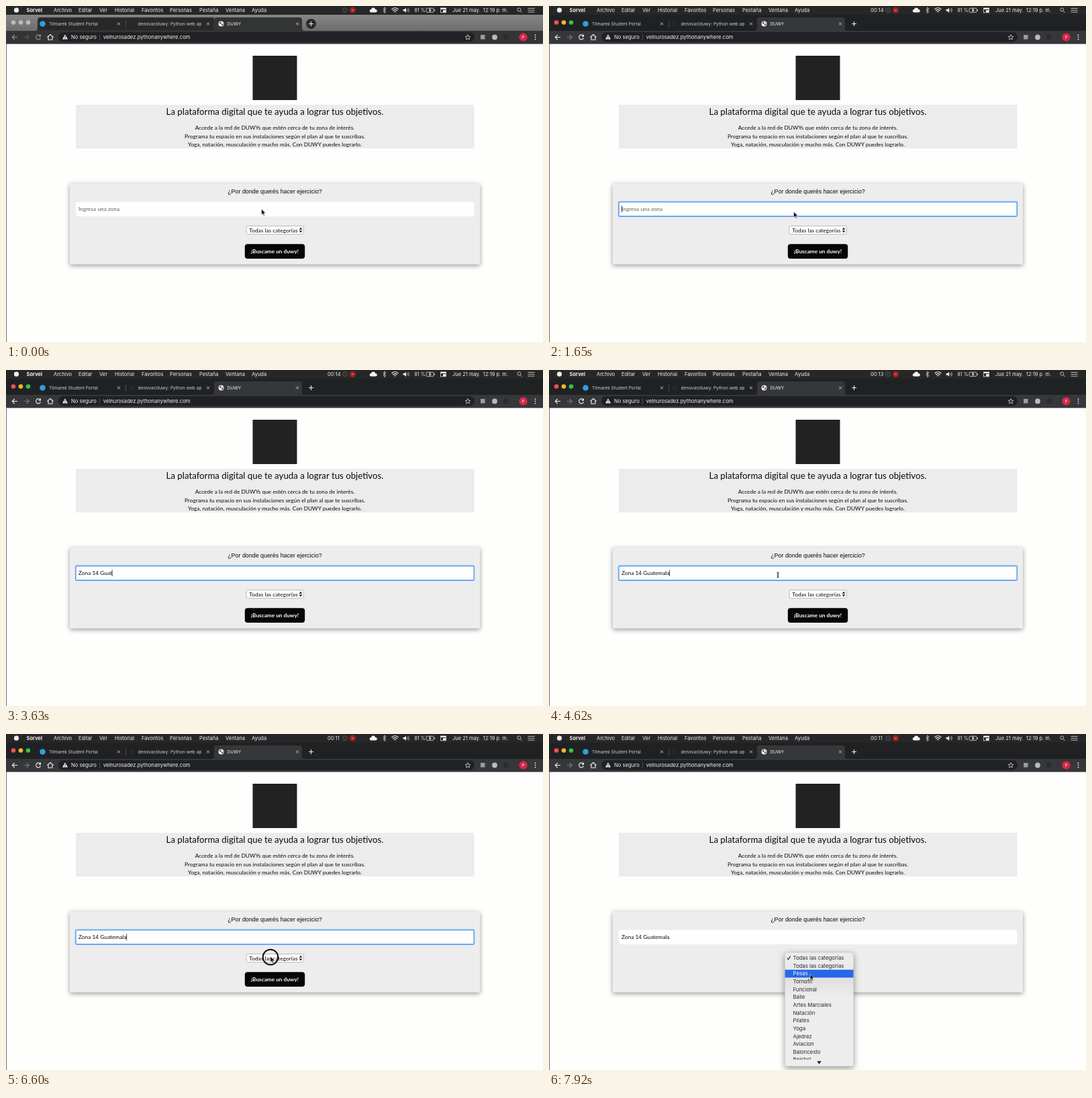
An HTML page that plays this animation: 800x500 px, repeating every 8000 ms.

```html
<!DOCTYPE html>
<html lang="es">
<head>
<meta charset="utf-8">
<title>Búsqueda por zona</title>
<style>
  html, body { margin: 0; width: 100%; height: 100%; overflow: hidden; background: #fefefc; }
  svg { display: block; width: 100vw; height: 100vh; }
  text { white-space: pre; }
  .ui { font-family: Inter, sans-serif; font-size: 7.5px; fill: #f1f1f1; }
  .tab { font-size: 6.6px; fill: #cfd0d2; }
  .address { font-size: 7.7px; }
  .page { font-family: Lato, sans-serif; font-size: 8.33px; fill: #0a0a0a; }
  .mid { text-anchor: middle; }
  .line { fill: none; stroke: #eee; stroke-width: 1.1; }
  .thin { fill: none; stroke: #ddd; stroke-width: .8; }
  .strip { fill: #202123; }
  .tabs { fill: #202123; }
  .open { fill: #36373a; }
  .plus { fill: none; }
  .idle .strip { fill: url(#idleStrip); }
  .idle .tabs { fill: #282828; stroke: #555; stroke-width: .6; }
  .idle .open { fill: #333435; }
  .idle .plus { fill: #2b2b2b; }
  .idle .nav { opacity: .5; }
  .card { filter: drop-shadow(0 2px 3.5px #0006); }
  .menu { filter: drop-shadow(0 3px 5px #0006); }
  .option { font-size: 7.8px; fill: #2b2b2b; }
</style>
</head>
<body>
<svg id="stage" viewBox="0 0 800 500" preserveAspectRatio="none">
  <defs>
    <clipPath id="tabClip"><rect x="190" y="15" width="102" height="22"/></clipPath>
    <clipPath id="menuClip"><rect x="351" y="325" width="103" height="159.5"/></clipPath>
    <linearGradient id="idleStrip" x2="0" y2="1">
      <stop stop-color="#868686"/><stop offset="1" stop-color="#6c6c6c"/>
    </linearGradient>
    <linearGradient id="menuFill" x2="0" y2="1">
      <stop offset=".1" stop-color="#ececec"/><stop offset=".24" stop-color="#e1e1e1"/><stop offset=".4" stop-color="#ededed"/>
    </linearGradient>
  </defs>

  <!-- menu bar -->
  <rect width="800" height="13" fill="#272727"/>
  <circle cx="15.5" cy="6.2" r="3.6" fill="#eee"/>
  <g id="menuBar" class="ui">
    <text id="timer" x="479" y="9"></text>
    <text x="608.5" y="9" style="font-size:7px">81 %</text>
    <text x="665" y="9">Jue 21 may.  12:19 p. m.</text>
  </g>
  <circle cx="505" cy="6.2" r="3.6" fill="#333" stroke="#555" stroke-width=".8"/>
  <circle cx="516.5" cy="6.2" r="3.7" fill="#7b1616" stroke="#d93630"/>
  <circle cx="516.5" cy="6.2" r="1.8" fill="#ff4a42"/>
  <path d="M544 9.5a2.3 2.3 0 0 1 0-4.6a3.3 3.3 0 0 1 6.3 0a2.3 2.3 0 0 1 .5 4.6z" fill="#f3f3f3"/>
  <path class="thin" d="M561.5 4l4.5 4.5l-2.3 2V2l2.3 2l-4.5 4.5"/>
  <path class="line" d="M574.5 5q5-4.4 10 0M576.2 7q3.3-2.7 6.6 0M578 8.8q1.5-1.2 3 0"/>
  <path d="M591.5 5h2l2.5-2.3v7.2l-2.5-2.3h-2z" fill="#eee"/>
  <path class="thin" d="M597.5 4.5q1.3 1.7 0 3.5M599.3 3.3q2.3 3 0 6"/>
  <rect class="thin" x="626" y="3.3" width="11" height="6" rx="1"/>
  <path d="M638 5.2h1v2.2h-1zM632.5 2.5l-3 4h2l-.8 3.500l3.200-4.300h-2z" fill="#eee"/>
  <rect class="thin" x="647.5" y="3" width="8" height="6.8"/>
  <path d="M648 3h7.5v2H648zM651 6h4v3.4h-4z" fill="#eee"/>
  <circle class="thin" cx="764.3" cy="5.5" r="2.5"/>
  <path class="thin" d="M766.2 7.4l2.6 2.6M777.5 3.5h10M777.5 6.3h10M777.5 9.1h10"/>

  <!-- browser window -->
  <rect class="strip" y="13" width="800" height="25"/>
  <path class="tabs" d="M44 37q3 0 3-4V21q0-4 4-4H310v20z"/>
  <path class="open" d="M306 37q4 0 4-4V21q0-4 4-4h123q4 0 4 4v12q0 4 4 4H800V56.5H0V37z"/>
  <path d="M178.5 22v10" stroke="#5b5c60" stroke-width=".7"/>
  <g id="lights"><circle cx="11" cy="24.5" r="3.3"/><circle cx="22" cy="24.5" r="3.3"/><circle cx="33" cy="24.5" r="3.3"/></g>
  <circle cx="54.5" cy="26.5" r="4.3" fill="#2d9fe0"/>
  <circle cx="187" cy="26.5" r="3.8" fill="#24272b"/>
  <g class="ui">
    <text class="tab" x="64" y="29">Tilmarek Student Portal</text>
    <text class="tab" x="196.5" y="29" clip-path="url(#tabClip)">denovar/duwy: Python web app</text>
    <text class="tab" x="329.5" y="29" style="fill:#f2f2f2">DUWY</text>
  </g>
  <circle cx="320.5" cy="26.5" r="4" fill="#eee"/>
  <path d="M317.5 25l2-1.5l1.5 1.5l-1.5 2zM321 27l2.5-1v2l-2 1.5z" fill="#555"/>
  <path class="thin" d="M166 24.5l4 4m0-4l-4 4M299 24.5l4 4m0-4l-4 4M432 24.5l4 4m0-4l-4 4"/>
  <circle class="plus" cx="454.5" cy="26.5" r="7.5"/>
  <path class="line" d="M451 26.5h7m-3.5-3.5v7"/>
  <rect x="78" y="39" width="620" height="14.5" rx="7.2" fill="#202124"/>
  <g class="nav">
    <path class="line" d="M17 46.5H9.5m3.3-3.5l-3.5 3.5l3.5 3.5"/>
    <path class="line" style="stroke:#77787b" d="M26.5 46.5H34m-3.3-3.5l3.5 3.5l-3.5 3.5"/>
    <path class="line" d="M51 44.3a3.5 3.5 0 1 0 .5 3.2"/><path d="M52 42v3.8h-3.8z" fill="#eee"/>
  </g>
  <path class="line" d="M61.5 46.5l4.5-4l4.5 4M63 46v4.3h6V46"/>
  <path d="M88 42.3l4 7.3h-8z" fill="#eee"/><path d="M88 44.8v2.4m0 .7v1" stroke="#202124" stroke-width=".9"/>
  <path d="M139.5 42v9" stroke="#55575b" stroke-width=".8"/>
  <g class="ui">
    <text class="address" x="97" y="49.2">No seguro</text>
    <text class="address" x="144.8" y="49.2">velnurosadez.pythonanywhere.com</text>
  </g>
  <path class="thin" d="M688 42.7l1.1 2.5l2.7.2l-2.1 1.8l.7 2.700l-2.400-1.400l-2.400 1.400l.7-2.700l-2.100-1.800l2.700-.2z"/>
  <rect x="707" y="43" width="6.5" height="6.5" fill="#9a9b9d"/>
  <circle cx="728" cy="46.4" r="3.9" fill="#b9babc"/>
  <circle cx="745" cy="46.4" r="3.9" fill="#2c2d2f"/>
  <circle cx="770.5" cy="46.4" r="6.2" fill="#d6264a"/>
  <text class="ui mid" x="770.5" y="48.8" style="font-size:6.5px">P</text>
  <path d="M788.5 43.2v.1m0 3.1v.1m0 3.1v.1" stroke="#eee" stroke-width="1.7" stroke-linecap="round"/>

  <!-- page -->
  <path d="M.3 56.5V500" stroke="#222" stroke-width=".8"/>
  <rect x="367.5" y="74" width="66" height="66" fill="#222"/>
  <rect x="104" y="147" width="593.5" height="65" fill="#ececed"/>
  <g class="page mid">
    <text x="400.5" y="161.5" style="font-size:13.25px">La plataforma digital que te ayuda a lograr tus objetivos.</text>
    <text x="400.5" y="184.3">Accede a la red de DUWYs que estén cerca de tu zona de interés.</text>
    <text x="400.5" y="196.6">Programa tu espacio en sus instalaciones según el plan al que te suscribas.</text>
    <text x="400.5" y="208.9">Yoga, natación, musculación y mucho más. Con DUWY puedes lograrlo.</text>
  </g>
  <rect class="card" x="95" y="264" width="611" height="120.5" rx="1" fill="#ededee"/>
  <text class="mid" x="400.5" y="279" style="font:8.89px 'Liberation Sans',sans-serif;fill:#0a0a0a">¿Por donde querés hacer ejercicio?</text>
  <rect x="104" y="291.5" width="593.5" height="21.5" rx="4" fill="#fefefc"/>
  <rect id="focus" x="103.800" y="291.5" width="593.5" height="21.5" rx="1.5" fill="#fefefc" stroke="#6aa9f4" stroke-width="1.9"/>
  <text id="field" class="page" x="108" y="305.3"></text>
  <path id="caret" stroke="#111" stroke-width=".8"/>
  <rect x="358" y="327.3" width="85.5" height="12.4" rx="2.5" fill="#fefefc" stroke="#aaa" stroke-width=".8"/>
  <text class="page" x="362.3" y="336.5">Todas las categorías</text>
  <path d="M436.7 332.7l2.3-3.2l2.3 3.2zM436.7 334.3l2.3 3.2l2.3-3.2z" fill="#222"/>
  <rect x="355.8" y="354.2" width="89.4" height="21.8" rx="4" fill="#050608"/>
  <text class="page mid" x="400.5" y="368.2" style="font-weight:700;font-size:8.25px;fill:#fff">¡Buscame un duwy!</text>

  <g id="menu" class="ui">
    <rect class="menu" x="351.3" y="325" width="102.5" height="169.5" rx="3" fill="url(#menuFill)" stroke="#bbb" stroke-width=".5"/>
    <rect id="highlight" x="351.5" width="102" height="11.7" fill="#2768e8"/>
    <g id="options" clip-path="url(#menuClip)"></g>
    <path id="check" class="line" d="M354.8 333.4l1.7 2.2l3.2-5"/>
    <path d="M399.3 486.8h6.4l-3.2 4.6z" fill="#222"/>
  </g>

  <g id="pointer">
    <circle id="ring" cy="1" r="11.3" fill="none" stroke="#111" stroke-width="2"/>
    <path id="arrow" d="M0 0v8.8l2-1.9l1.4 3.2l1.5-.6l-1.4-3.2h2.8z" fill="#111" stroke="#fff" stroke-width=".6"/>
    <path id="beam" d="M-1.7-4q1.7 0 1.7 1V3q0 1-1.7 1M1.7-4Q0-4 0-3V3q0 1 1.7 1" fill="none" stroke="#222" stroke-width=".9"/>
  </g>
</svg>
<script>
const $ = id => document.getElementById(id);
const show = (id, on) => $(id).style.display = on ? '' : 'none';
const STEP = 330, LOOP = 8000, ROW = 11.65, FIRST_ROW = 333.2;

function addText(parent, x, y, content, className = '') {
  const node = document.createElementNS('http://www.w3.org/2000/svg', 'text');
  node.setAttribute('x', x);
  node.setAttribute('y', y);
  node.setAttribute('class', className);
  node.textContent = content;
  return parent.appendChild(node);
}

const barItems = [[30.5, 'Sorvel'], [71, 'Archivo'], [108, 'Editar'], [139, 'Ver'], [162, 'Historial'],
  [202, 'Favoritos'], [244, 'Personas'], [288, 'Pestaña'], [327, 'Ventana'], [366, 'Ayuda']];
barItems.forEach(([x, label], i) => {
  const item = addText($('menuBar'), x, 9, label);
  if (!i) item.style.fontWeight = 700;
});

const options = ['Todas las categorías', 'Todas las categorías', 'Pesas', 'Tornofit', 'Funcional', 'Baile',
  'Artes Marciales', 'Natación', 'Pilates', 'Yoga', 'Ajedrez', 'Aviacion', 'Baloncesto', 'Beisbol']
  .map((label, i) => addText($('options'), 363.5, FIRST_ROW + i * ROW + 2.8, label, 'option'));

// Pointer path: step, x, y
const path = [[0, 380.5, 302], [3, 364.5, 306], [8, 364.5, 306], [13, 341, 305], [16, 341, 305],
  [17, 394, 325], [18, 394, 325], [20, 394, 331], [22, 394, 331], [23, 391, 381], [24, 389, 357]];

function pointerAt(step) {
  const next = Math.max(1, path.findIndex(p => p[0] >= step));
  const [a, b] = [path[next - 1], path[next]];
  const u = (step - a[0]) / (b[0] - a[0]);
  return [a[1] + (b[1] - a[1]) * u, a[2] + (b[2] - a[2]) * u];
}

const query = 'Zona 14 Guatemala';

function draw(time) {
  const step = Math.floor(time % LOOP / STEP);

  $('stage').setAttribute('class', step < 5 ? 'idle' : '');
  const colors = step < 4 ? ['#bbb', '#bbb', '#bbb'] : ['#f4524d', '#f5b52e', '#30c544'];
  [...$('lights').children].forEach((light, i) => light.setAttribute('fill', colors[i]));
  const seconds = 14 - [12, 16, 20].filter(s => step >= s).length;
  $('timer').textContent = step < 2 ? '' : '00:' + seconds;

  const typed = query.slice(0, Math.max(0, Math.min(query.length, (step - 7) * 3)));
  const focused = step >= 5 && step < 21;
  const field = $('field');
  field.textContent = typed || 'Ingresa una zona';
  field.style.fill = typed ? '' : '#606060';
  show('focus', focused);
  show('caret', focused && step % 3);
  const caretX = typed ? 108.2 + field.getComputedTextLength() : 108.5;
  $('caret').setAttribute('d', `M${caretX} 297.5v9.5`);

  const open = step >= 21;
  const selected = step < 23 ? 0 : step === 23 ? 4 : 2;
  show('menu', open);
  $('highlight').setAttribute('y', FIRST_ROW + selected * ROW - 5.7);
  options.forEach((option, i) => option.style.fill = i === selected ? '#fff' : '');
  $('check').style.stroke = selected ? '#222' : '#fff';

  const [x, y] = pointerAt(step);
  const beam = step >= 13 && step < 17;
  $('pointer').setAttribute('transform', `translate(${x} ${y})`);
  show('pointer', step < 9 || step >= 13);
  show('beam', beam);
  show('arrow', !beam);
  show('ring', step === 4 || step === 20);
}

function tick() {
  draw(performance.now());
  requestAnimationFrame(tick);
}
tick();
</script>
</body>
</html>
```
